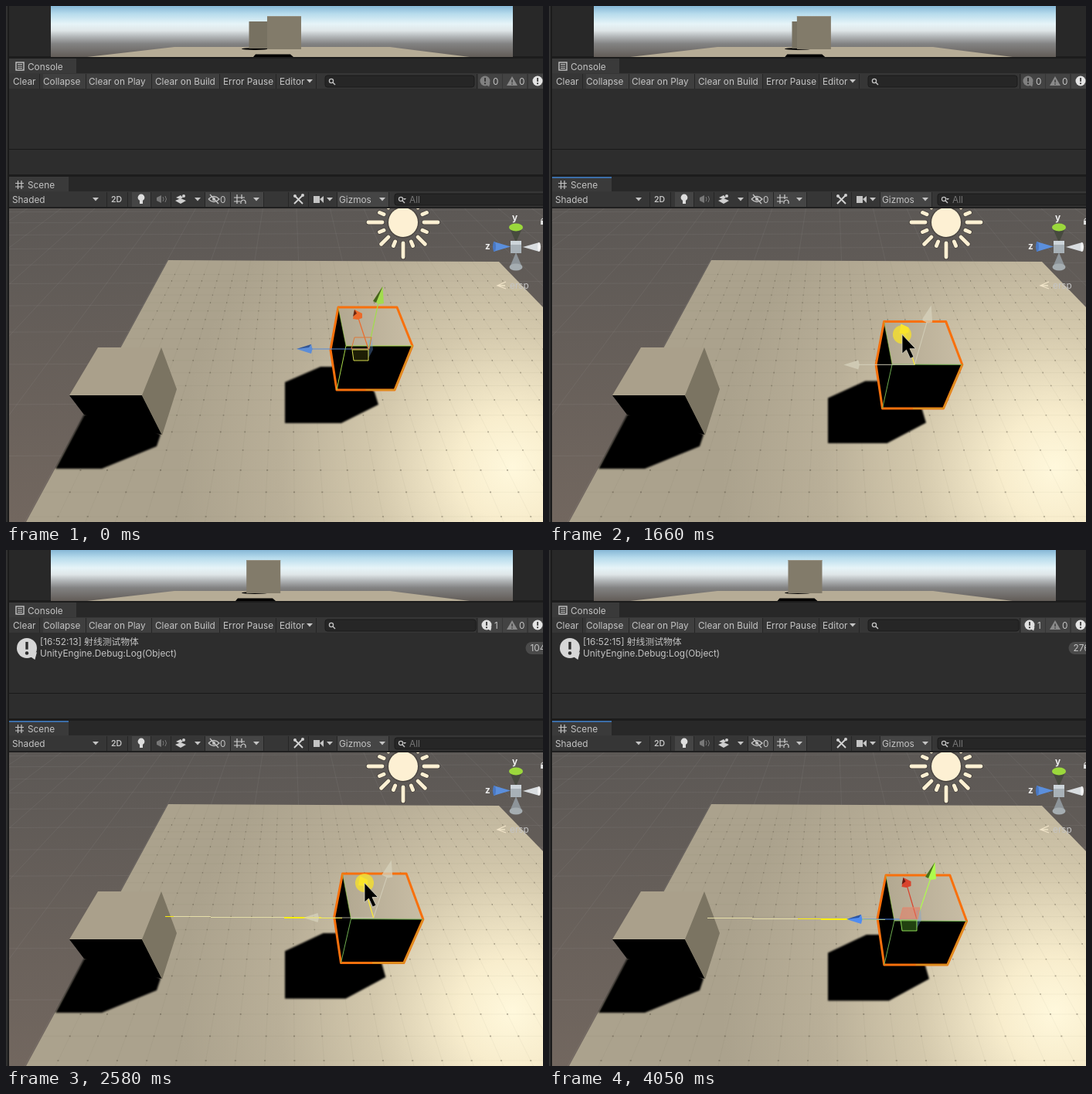
Animation, 695 px wide and 668 px high, one loop 4120 ms. Source, as an HTML page:

```html
<!DOCTYPE html>
<html lang="en">
<head>
<meta charset="utf-8">
<title>Scene editor</title>
<style>
html, body { margin: 0; width: 100%; height: 100%; overflow: hidden; background: #282828; }
svg { display: block; width: 695px; height: 668px; }
text { font-family: Inter, "Noto Sans CJK SC", "Noto Sans CJK", sans-serif; font-size: 11.8px; fill: #c4c4c4; white-space: pre; }
.small { font-size: 10.5px; font-weight: 600; }
.axis { font-weight: 700; fill: #eee; }
.dim { fill: #777; }
</style>
</head>
<body>
<svg id="stage" viewBox="0 0 695 668" xmlns="http://www.w3.org/2000/svg">
<defs>
  <linearGradient id="sky" x1="0" y1="0" x2="0" y2="66" gradientUnits="userSpaceOnUse">
    <stop offset="0" stop-color="#86b7d6"/><stop offset=".15" stop-color="#b6dbec"/>
    <stop offset=".35" stop-color="#e6f4f8"/><stop offset=".48" stop-color="#dfe6e8"/>
    <stop offset=".6" stop-color="#b2b6b8"/><stop offset=".74" stop-color="#838383"/>
    <stop offset="1" stop-color="#625c57"/>
  </linearGradient>
  <linearGradient id="ground" x1="0" y1="262" x2="0" y2="668" gradientUnits="userSpaceOnUse">
    <stop offset="0" stop-color="#5c5855"/><stop offset="1" stop-color="#72675f"/>
  </linearGradient>
  <radialGradient id="floor" cx="655" cy="598" r="430" gradientUnits="userSpaceOnUse">
    <stop offset="0" stop-color="#fff8dc"/><stop offset=".16" stop-color="#f8edcd"/>
    <stop offset=".42" stop-color="#d3c8ac"/><stop offset=".7" stop-color="#b9af98"/>
    <stop offset="1" stop-color="#aba28d"/>
  </radialGradient>
  <linearGradient id="lid">
    <stop offset="0" stop-color="#b2a891"/><stop offset="1" stop-color="#c8bda5"/>
  </linearGradient>
  <filter id="soft"><feGaussianBlur stdDeviation="1.3"/></filter>
  <clipPath id="view"><rect x="4" y="262" width="691" height="406"/></clipPath>
  <clipPath id="game"><rect x="58" y="0" width="598" height="66"/></clipPath>
  <clipPath id="slab"><polygon points="210,329 638,331 695,390 695,668 26,668"/></clipPath>
</defs>
<g id="panels"></g>
<g clip-path="url(#game)" id="gameView"></g>
<g id="log"></g>
<g clip-path="url(#view)">
  <g id="land"></g>
  <g id="scene"></g>
  <g id="over"></g>
</g>
<g id="pointer"></g>
</svg>
<script>
const LOOP = 4120, TICK = 70;
const PRESS = 1180, GRAB = 1380, HIT = 1730, RELEASE = 3210;
const INK = '#c4c4c4';
const $ = id => document.getElementById(id);
const r1 = n => Math.round(n * 10) / 10;

const rect = (x, y, w, h, fill, more = '') => `<rect x="${r1(x)}" y="${y}" width="${w}" height="${h}" fill="${fill}" ${more}/>`;
const poly = (pts, fill, more = '') => `<polygon points="${pts.map(p => p.map(r1).join()).join(' ')}" fill="${fill}" ${more}/>`;
const path = (d, color, w = 1) => `<path d="${d}" stroke="${color}" stroke-width="${w}" fill="none"/>`;
const line = (a, b, color, w = 1) => path(`M${a.map(r1)}L${b.map(r1)}`, color, w);
const disc = (x, y, r, fill) => `<circle cx="${r1(x)}" cy="${r1(y)}" r="${r}" fill="${fill}"/>`;
const oval = (x, y, rx, ry, fill) => `<ellipse cx="${x}" cy="${y}" rx="${rx}" ry="${ry}" fill="${fill}"/>`;
const label = (x, y, s, cls = '') => `<text x="${x}" y="${y}" class="${cls}">${s}</text>`;
const caret = (x, y, w = 8) => poly([[x, y], [x + w, y], [x + w / 2, y + w * .56]], INK);
const rules = (xs, y) => xs.map(x => rect(x, y, 1, 19, '#262626')).join('');
const field = (x, y, w) => rect(x, y, w, 15, '#262626', 'rx="3" stroke="#1b1b1b"') + path(`M${x + 10} ${y + 9}l3 3`, INK, 1.4) +
  `<circle cx="${x + 8}" cy="${y + 7}" r="2.6" stroke="${INK}" stroke-width="1.3" fill="none"/>`;
const mark = (x, y, r, ink) => rect(x - r * .13, y - r * .62, r * .26, r * .75, ink) + disc(x, y + r * .5, r * .17, ink);
const bubble = (x, y, r, fill) => disc(x, y, r, fill) +
  poly([[x, y + r * .6], [x + r, y + r * .4], [x + r * .8, y + r * 1.15]], fill) + mark(x, y, r, '#2d2d2d');

// 0 before a, 1 after b, smooth between
function ease(t, a, b) {
  const u = Math.min(1, Math.max(0, (t - a) / (b - a)));
  return u * u * (3 - 2 * u);
}

function drawPanels() {
  let s = rect(0, 0, 695, 668, '#282828') + rect(0, 0, 2, 668, '#313131') + rect(2, 0, 2, 668, '#1b1b1b');
  for (const y of [68, 221]) {
    s += rect(4, y - 3, 691, 3, '#1c1c1c') + rect(4, y, y > 68 ? 77 : 87, 20, '#3a3a3a') + rect(4, y + 19, 691, 20, '#363636');
  }
  s += rect(48, 88, 228, 19, '#3f3f3f') + rules([43, 103, 188, 276, 349, 401, 609], 88);
  s += rect(4, 107, 691, 111, '#2d2d2d') + rect(4, 185, 691, 1, '#191919') + rect(4, 260, 691, 2, '#1f1f1f');
  // console tab and buttons
  s += rect(13, 73, 10, 10, 'none', `stroke="${INK}" stroke-width="1.4"`) + path('M15 75.5h6M15 78h6M15 80.5h6', INK, 1.1);
  s += label(28, 83, 'Console') + label(9, 102, 'Clear') + label(48, 102, 'Collapse') + label(107, 102, 'Clear on Play');
  s += label(193, 102, 'Clear on Build') + label(281, 102, 'Error Pause') + label(354, 102, 'Editor') + caret(389, 95);
  // scene tab and toolbar
  for (const [x, w] of [[163, 24], [258, 32], [291, 42], [429, 66]]) s += rect(x, 241, w, 19, '#454545');
  s += rules([130, 157, 187, 213, 257, 290, 333, 365, 391, 428, 495], 241);
  for (const x of [112, 244, 320, 415, 483]) s += caret(x, 248);
  s += path('M15.5 226v11M20 226v11M12 229.5h11M12 234h11', INK, 1.2);
  s += label(28, 236, 'Scene') + label(8, 255, 'Shaded') + label(136, 254, '2D', 'small') + label(431, 255, 'Gizmos');
  s += disc(175, 248, 4.4, '#dedede') + rect(173, 251, 4, 5, '#dedede');
  s += poly([[195, 248], [201, 245], [201, 255], [195, 252]], '#777') + path('M203 247q2 3 0 6M206 246q3 4 0 8', '#777');
  s += poly([[219, 252], [226, 249], [233, 252], [226, 256]], '#cfcfcf') + poly([[220, 248], [226, 245], [229, 248], [225, 250]], '#cfcfcf') + disc(230, 246, 2, '#cfcfcf');
  s += path('M262 250q7 -7 14 0q-7 7 -14 0M264 244l11 12', INK, 1.3) + disc(269, 250, 2, INK) + label(277, 255, '0');
  s += path('M299 244v12M305 244v6M295 248h14M295 253h8M304 256v-3q4 -4 6 0v3', '#cfcfcf', 1.2);
  s += path('M373 245l11 11M384 245l-11 11', '#d0d0d0', 2) + disc(374, 246, 2, '#d0d0d0') + disc(384, 245, 2, '#d0d0d0');
  s += rect(398, 246, 8, 9, INK) + poly([[406, 250], [411, 246], [411, 255]], INK);
  s += field(503, 243, 200) + caret(514, 249, 4) + label(522, 255, 'All', 'dim');
  $('panels').innerHTML = s;
}

function drawLand() {
  const vx = 367, vy = 39, cells = 24;
  const seam = (m, y) => `${r1(vx + m * (y - vy))} ${y}`;
  const slope = j => -.543 + 1.475 * j / cells;
  let web = '', seams = '', dots = '';
  for (let i = -16; i <= 10; i++) web += `M${seam(i * .195 + .04, 262)}L${seam(i * .195 + .04, 668)}`;
  for (let i = 0; i < 12; i++) {
    const y = vy + 1 / (.00445 - i * .00026);
    web += `M0 ${r1(y + 3)}L695 ${r1(y)}`;
  }
  // seams meet at the vanishing point; rows are even in 1 / depth
  for (let j = 1; j < cells; j++) seams += `M${seam(slope(j), 329)}L${seam(slope(j), 668)}`;
  for (let i = 0; i < 20; i++) {
    const d = 1 / (1 / 622 + i * 8.6e-5), size = d / 300;
    seams += `M26 ${r1(vy + d)}H695`;
    for (let j = 1; j < cells; j++) dots += `M${r1(vx + slope(j) * d - size / 2)} ${r1(vy + d)}h${r1(size)}`;
  }
  $('land').innerHTML = rect(4, 262, 691, 406, 'url(#ground)') + path(web, 'rgba(200,200,200,.08)') +
    `<g clip-path="url(#slab)">${rect(4, 262, 691, 406, 'url(#floor)')}${path(seams, 'rgba(90,80,60,.05)')}${path(dots, 'rgba(70,62,48,.38)', 1.6)}</g>`;
}

function drawOverlay() {
  const cream = '#fdf0d3', shade = 'rgba(60,55,50,.6)';
  let rays = '';
  for (let k = 0; k < 16; k++) {
    const a = k * Math.PI / 8, c = Math.cos(a), s = Math.sin(a), end = k % 4 === 0 ? 45 : k % 2 ? 33 : 40;
    rays += `M${r1(514 + 27 * c)} ${r1(280 + 27 * s)}L${r1(514 + end * c)} ${r1(280 + end * s)}`;
  }
  let o = `<g stroke-linecap="round">${path(rays, shade, 6.5)}${path(rays, cream, 4.8)}</g>` + disc(514, 280, 20.5, shade) + disc(514, 280, 19, cream);
  // view compass
  o += label(655, 278, 'y', 'axis') + label(620, 315, 'z', 'axis');
  o += poly([[652, 288], [668, 288], [660, 306]], '#474a3f') + oval(660, 286.5, 9, 5, '#9bd83c');
  o += poly([[631, 305], [631, 318], [653, 311.5]], '#5b8fdc') + oval(632, 311.5, 2, 6.5, '#4a78c2');
  o += poly([[690, 306], [690, 318], [669, 312]], '#d9dde0') + oval(690, 312, 2, 6, '#f2f2f2');
  o += poly([[660, 319], [652, 338], [668, 338]], '#8d9499') + oval(660, 338, 8.5, 4.5, '#a5adb1');
  o += rect(653, 304, 14, 16, '#a8b1b7') + rect(653, 304, 14, 5, '#cdd5da');
  o += path('M647 357L636 362L647 366M636 362H646', '#f0e3c8', 1.3) + label(652, 366, 'ersp');
  o += rect(692, 278, 6, 5, '#ddd') + path('M693 278v-2q2 -2 4 0', '#ddd');
  $('over').innerHTML = o;
}

// how far the cube has been dragged: past the line, back, then settled
const slide = t => 1.15 * ease(t, 1290, 2010) - .21 * ease(t, 2100, 2500) + .06 * ease(t, 2810, 2920);

function mouse(t, p) {
  const enter = 1 - Math.pow(1 - Math.min(1, (t - 120) / 490), 1.7);
  const reach = ease(t, 680, 1040), leave = ease(t, 3280, 3700);
  return [626 - 151 * enter - 18 * reach + 7 * ease(t, 2360, 2580) + 242 * leave,
    628 - 232 * enter + 6 * reach + 30 * Math.sqrt(p) + 238 * leave];
}

// log total, redrawn every other tick and paused mid-drag
function count(t) {
  const shown = t >= 2570 && t < 3060 ? 2660 : 1660 + 140 * Math.floor((t - 1660) / 140);
  return Math.max(1, Math.round(276 * Math.pow(Math.max(0, shown - HIT) / 2310, 1.07)));
}

function drawGame(p) {
  const x = 338 - 28.5 * p, sh = 320 - 24.5 * p;
  $('gameView').innerHTML = rect(58, 0, 598, 66, 'url(#sky)') +
    poly([[218, 53], [497, 53], [600, 66], [105, 66]], '#b6ac96') +
    oval(322, 55.5, 17, 1.5, '#000') + rect(314.5, 20, 26, 35, '#777161') +
    poly([[sh + 3, 62.5], [sh + 48, 62.5], [sh + 52, 66], [sh, 66]], '#000') +
    rect(x, 13, 44, 43, '#827b6a') + rect(x, 13, 44, 1, '#948d7d');
}

function drawLog(t) {
  const on = t >= HIT, shift = on ? 2 : 0;
  let s = field(413, 90, 193 + shift);
  for (const x of [611, 643, 676]) s += rect(x, 88, 31, 19, '#434343');
  s += bubble(620 + shift, 97, 6.5, on ? '#e0e0e0' : '#808080') + label(630 + shift, 102, on ? 1 : 0);
  s += poly([[648, 103], [655, 91], [662, 103]], '#8a8a8a') + mark(655, 98.5, 5, '#333') + label(664, 102, 0);
  s += disc(688, 97, 6.5, '#e4e4e4') + mark(688, 97, 6.5, '#333');
  if (t >= GRAB) s += rect(4, 221, 77, 2, '#3c6ea8');
  if (on) {
    const n = String(count(t)), left = 695 - 7.5 * n.length;
    s += bubble(27, 127, 13, '#d6d6d6');
    s += label(44, 123, `[16:52:${13 + (t >= 3060) + (t >= 4040)}] 射线测试物体`) + label(44, 138, 'UnityEngine.Debug:Log(Object)');
    s += rect(left, 119, 40, 16, '#4a4a4a', 'rx="8"') + label(left + 6, 131, n);
  }
  $('log').innerHTML = s;
}

function drawGizmo(p, t) {
  const after = t >= RELEASE, held = t >= GRAB && !after;
  const hotY = t >= 540 && t < 740, hotX = t >= 740 && !after;
  const pale = 'rgba(214,210,188,.75)', hot = '#ffee32';
  const green = held ? pale : hotY ? '#f5efb0' : after || hotX ? '#aefc4e' : '#a2dc4e';
  const blue = held ? pale : after ? '#4f8cf2' : '#5c8dd8';
  const red = hotX ? hot : after ? '#d9432c' : '#ec6a2a';
  const move = (x, y, dx, dy) => [x + dx * p, y + dy * p];
  const o = move(469, 444, 7, 34), y = move(482, 384, 12, 41), z = move(395, 444, 9, 34), x = move(455, 401, 7.5, 31);
  const shape = (c, pts, fill, edge = 'none') => poly(pts.map(([a, b]) => [c[0] + a, c[1] + b]), fill, `stroke="${edge}"`);
  let s = line(z, o, blue, 1.2) + line(o, y, green, 1.2) + line(x, o, red, 1.2);
  if (!held) {
    s += shape(o, [[-1, -11], [5, -13], [6, 1], [0, 12]], 'rgba(110,160,230,.35)');
    s += shape(o, [[-18, -15], [4, -15], [1, 0], [-22, 0]], after ? 'rgba(235,120,95,.5)' : 'none', after ? '#e08a70' : '#dd7838');
    s += shape(o, [[-21, 1], [0, 1], [0, 15], [-19, 15]], after ? 'rgba(60,120,30,.55)' : 'rgba(120,120,20,.25)', after ? '#8fdc58' : '#d5da4e');
  }
  s += shape(y, [[5.5, -21], [-7, -2], [1, 2], [7, 1]], green);
  s += shape(z, [[-19, 0], [0, -6], [1.5, 0], [0, 6]], blue);
  s += shape(x, [[-4, -8], [6, -3], [6, 3], [0, 5], [-6, 4]], red);
  if (!held) s += shape(y, [[5.5, -21], [-7, -2], [-3, 0]], 'rgba(20,30,0,.65)') + shape(z, [[-19, 0], [0, -6], [-3, -2]], 'rgba(10,30,80,.5)');
  if (!hotX) s += shape(x, [[-4, -8], [-6, 1], [-1, -3]], 'rgba(40,0,0,.65)');
  return s;
}

function drawRay(p, tail) {
  const y = 442.5 + 34 * p, end = 219 - 14 * p, near = p < .98;
  const on = x => [x, y + 2 * (x - end) / (tail - end)];
  return '<g shape-rendering="crispEdges">' + line(on(end), on(tail), '#e6dfa8') +
    line(on(near ? 360 : 322), on(tail), '#fdf00e', 1.5) + (near ? line(on(end), on(end + 11), '#fdf00e', 1.5) : '') + '</g>';
}

function drawScene(p, t) {
  // nearing the camera: corners spread sideways, front ones drop further
  const corner = (x, y, drop) => [x + p * (6 + .09 * (x - 430)), y + p * drop];
  const tl = corner(430, 390, 31), tr = corner(506, 390, 31), l = corner(420, 445, 32);
  const fl = corner(440, 440, 40), r = corner(526, 440, 40.5), br = corner(503, 497, 40), bl = corner(428, 497, 40);
  const hull = [tl, tr, r, br, bl, l], black = 'filter="url(#soft)"';
  const shadow = [[361, 487], [407, 467], [450, 467], [477, 500], [482, 516], [434, 540], [361, 540]]
    .map(([x, y]) => [x + p * .083 * (x - 361), y + p * (31 + .17 * (y - 467))]);
  let s = poly(shadow, '#000', black);
  // still cube
  s += poly([[101, 529], [150, 520], [200, 555], [195, 570], [124, 599], [64, 599]], '#000', black);
  s += poly([[82, 504], [176, 504], [202, 555], [101, 529]], '#000');
  s += poly([[119, 442], [201, 442], [176, 504], [82, 504]], '#aaa08b');
  s += poly([[201, 442], [221, 496], [202, 556], [176, 504]], '#7b7462');
  // dragged cube
  s += poly(hull, '#000') + poly([tl, tr, r, fl], 'url(#lid)');
  s += poly(hull, 'none', 'stroke="#f8700c" stroke-width="3" stroke-linejoin="round"');
  const edge = t >= GRAB ? '#6fae50' : '#a9dc4a', faint = 'rgba(150,210,70,.6)';
  s += line(fl, r, edge) + line(fl, bl, edge) + line(tl, fl, faint) + line(r, br, faint) + line([(bl[0] + br[0]) / 2, bl[1]], br, faint);
  if (t >= HIT) s += drawRay(p, l[0] + 10);
  $('scene').innerHTML = s + drawGizmo(p, t);
}

function drawPointer(p, t) {
  let s = '';
  if (t >= 120 && t < 3700) {
    const [x, y] = mouse(t, p);
    if (t >= PRESS && t < RELEASE) s += disc(x, y, 12, 'rgba(248,226,40,.76)');
    s += `<path transform="translate(${r1(x)} ${r1(y)})" d="M0 0V25L5.5 20L10.5 31L15 29L10 18.5H17.5Z" fill="#000" stroke="#ddd8c8" stroke-width=".8"/>`;
  }
  $('pointer').innerHTML = s;
}

const start = performance.now();
let last = null;
function frame() {
  const ms = (performance.now() - start) % LOOP;
  const t = ms < 130 ? 0 : 120 + TICK * Math.floor((ms - 120) / TICK);
  if (t !== last) {
    last = t;
    const p = slide(t);
    drawGame(p);
    drawLog(t);
    drawScene(p, t);
    drawPointer(p, t);
  }
  requestAnimationFrame(frame);
}
drawPanels();
drawLand();
drawOverlay();
frame();
</script>
</body>
</html>
```
